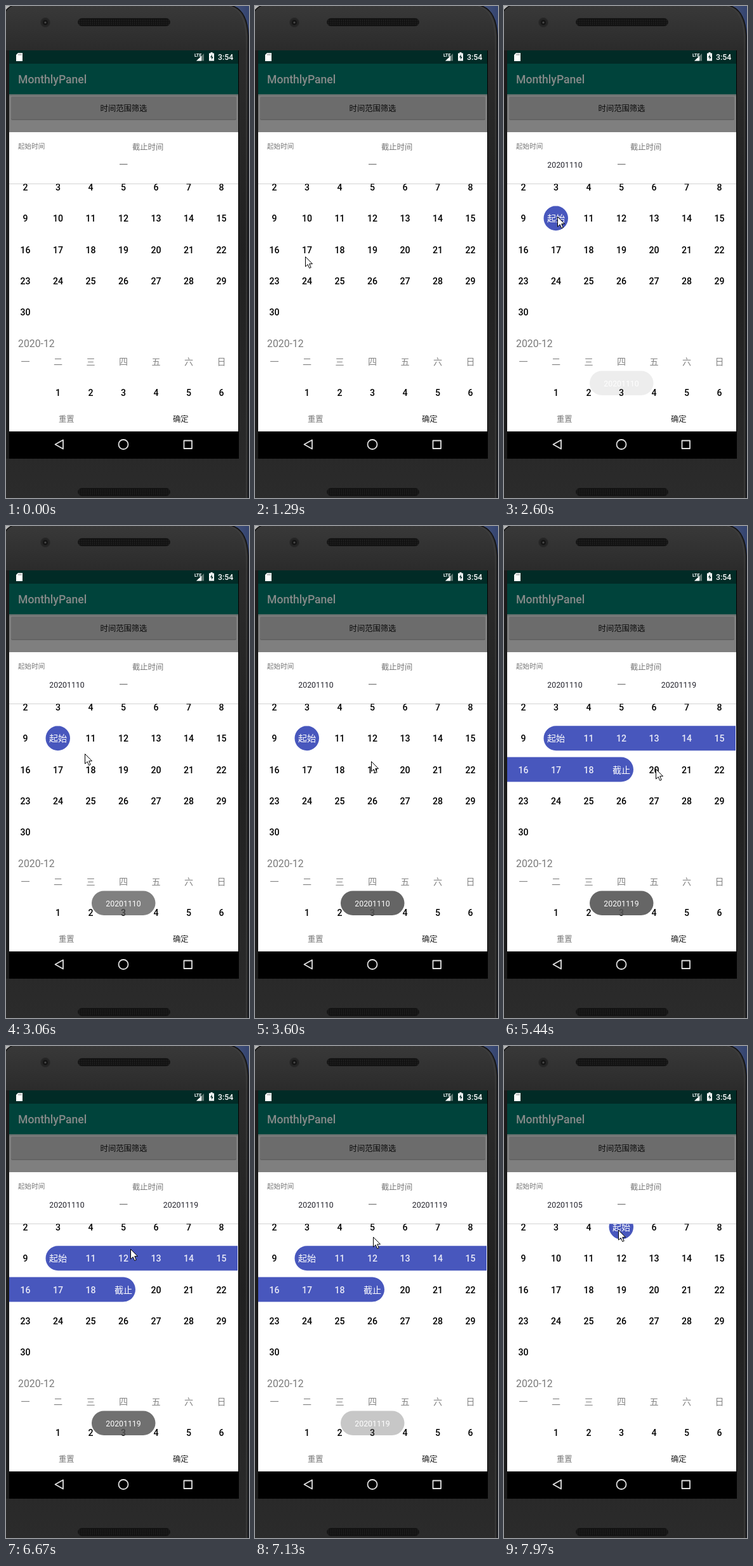
An HTML page that plays this animation: 383 px wide and 776 px high, repeating every 8 s.

```html
<!DOCTYPE html>
<html lang="zh">
<head>
<meta charset="utf-8">
<style>
  html, body { margin: 0; width: 100%; height: 100%; overflow: hidden; background: #262626; }
  svg { display: block; width: 100%; height: 100%; }
  text { font-family: Roboto, "Noto Sans CJK SC", "Noto Sans CJK", sans-serif; font-size: 12.3px; }
  .mid { text-anchor: middle; }
  .day { font-size: 14.1px; font-weight: 500; }
  .week { font-size: 14.1px; fill: #858585; }
  .mark { font-size: 14.1px; fill: #fff; }
</style>
</head>
<body>
<svg viewBox="0 0 383 776">
  <defs>
    <linearGradient id="body" x2="0" y2="1">
      <stop stop-color="#393939"/><stop offset=".09" stop-color="#2b2b2b"/>
      <stop offset=".5" stop-color="#202020"/><stop offset="1" stop-color="#2b2b2b"/>
    </linearGradient>
    <linearGradient id="desk">
      <stop stop-color="#b8b8b8"/><stop offset=".8" stop-color="#687293"/><stop offset="1" stop-color="#34446f"/>
    </linearGradient>
    <pattern id="mesh" width="3" height="3" patternUnits="userSpaceOnUse">
      <rect width="3" height="3" fill="#101010"/><circle cx="1.5" cy="1.5" r=".7" fill="#343434"/>
    </pattern>
    <clipPath id="listArea"><rect x="5" y="280.5" width="361" height="360"/></clipPath>
  </defs>

  <!-- phone -->
  <rect width="383" height="776" fill="url(#desk)"/>
  <path d="M-1 9Q3 2 11-1H354Q380 5 382 47V777H-1Z" fill="url(#body)" stroke="#111" stroke-width="1.5"/>
  <path d="M352 0Q377 7 379 49V776" fill="none" stroke="#444"/>
  <rect y="70" width="5" height="644" fill="#1b1b1b"/>
  <g fill="url(#mesh)" stroke="#191919">
    <rect x="113.500" y="19.500" width="145" height="12" rx="6"/>
    <rect x="113.500" y="760.500" width="145" height="12" rx="6"/>
  </g>
  <circle cx="62" cy="26" r="7.500" fill="#242424" stroke="#2d2d2d"/>
  <circle cx="62" cy="26" r="4" fill="#151515"/>
  <circle cx="62" cy="26" r="1.600" fill="#4a4a4a"/>

  <!-- dimmed app -->
  <rect x="5" y="70" width="362" height="644"/>
  <rect x="5" y="70" width="361" height="21" fill="#012b26"/>
  <rect x="5" y="91" width="361" height="49" fill="#00433b"/>
  <rect x="5" y="139.500" width="361" height="60" fill="#7f7f7f"/>
  <rect x="5" y="139.500" width="361" height="2" fill="#6c7271"/>
  <rect x="8" y="144" width="355" height="36" rx="2" fill="#606060"/>
  <rect x="8" y="143" width="355" height="35.500" rx="2" fill="#6c6c6c"/>
  <text x="19" y="122" fill="#868a89" style="font-size:17.6px;font-weight:500">MonthlyPanel</text>
  <text x="185.500" y="165.500" class="mid" fill="#0c0c0c">时间范围筛选</text>
  <path d="M19 74H26V87H16V77Z" fill="#fff"/>
  <path d="M20 75V78M22 75V78M24 75V78" stroke="#777" stroke-width=".8"/>
  <path d="M312 75V86.500H300Z" fill="#627873"/>
  <path d="M308 79V86.500H300Z" fill="#fff"/>
  <text x="297" y="79.500" fill="#fff" style="font-size:7px;font-weight:700">LTE</text>
  <path d="M322.500 73H325.500V74.500H328V86.500H320V74.500H322.500Z" fill="#fff"/>
  <path d="M325 76L322 81H324V85L326.500 80H324.500Z" fill="#012b26"/>
  <text x="334" y="85" fill="#fff" style="font-weight:500">3:54</text>

  <!-- sheet -->
  <rect x="5" y="199" width="361" height="472" fill="#fff"/>
  <g fill="#757575">
    <text x="19" y="225" style="font-size:10.6px">起始时间</text>
    <text x="199" y="227">截止时间</text>
    <rect x="179" y="249" width="12.500" height="1.200"/>
    <text x="83" y="655.500">重置</text>
  </g>
  <text x="263" y="655.500" fill="#222">确定</text>
  <g class="mid" fill="#25252e">
    <text id="from" x="96" y="255"></text>
    <text id="to" x="275.500" y="255"></text>
  </g>
  <rect x="5" y="280" width="361" height="1" fill="#d3d3d3"/>
  <g id="list" clip-path="url(#listArea)"></g>

  <!-- navigation bar -->
  <g fill="none" stroke="#e2e2e2" stroke-width="1.800" stroke-linejoin="round">
    <path d="M77.500 691.500L90 684.500V698.500Z"/>
    <circle cx="185" cy="691.500" r="7.500"/>
    <rect x="280.500" y="685.500" width="12.500" height="12.500"/>
  </g>

  <g id="toast">
    <rect x="135" y="575.500" width="100.500" height="38.500" rx="19.250" fill="#555"/>
    <text id="toastText" x="185" y="600" class="mid" fill="#fff"></text>
  </g>
  <path id="cursor" d="M.5.500V16L4.200 12.700L6.700 18.500L9.200 17.400L6.700 11.700H11.500Z" fill="#fff" stroke="#000" stroke-linejoin="round"/>
</svg>

<script>
const LOOP = 8000, STEP = 76.77, FIRST_STEP = 365;
const BLUE = '#4857bd', RADIUS = 19.5;
const $ = id => document.getElementById(id);

// Keyframes: time, then values
const cursorKeys = [
  [370, 276, 757], [680, 166, 555], [903, 166, 555], [1290, 79, 395],
  [1523, 79, 395], [2140, 84, 332], [2600, 84, 332], [3060, 124, 359],
  [3370, 169, 363], [3680, 188, 374], [4985, 188, 374], [5140, 203, 364],
  [5440, 239, 383], [5600, 244, 385], [5820, 238, 383], [6670, 196, 320],
  [6745, 196, 320], [7360, 180, 290]
];
const toastKeys = [
  [2523, 0], [3060, .75], [3370, .9], [4985, .9], [5140, .55], [5215, .55],
  [5440, .9], [6300, .9], [6670, .84], [6745, .84], [7360, 0]
];
const selections = [
  { at: 0 }, { at: 2600, start: 10 }, { at: 4140, start: 10, end: 19 }, { at: 7970, start: 5 }
];

function sample(keys, t) {
  const next = keys.findIndex(key => key[0] > t);
  if (next === 0) return keys[0].slice(1);
  if (next < 0) return keys[keys.length - 1].slice(1);
  const a = keys[next - 1], b = keys[next], k = (t - a[0]) / (b[0] - a[0]);
  return a.slice(1).map((v, i) => v + (b[i + 1] - v) * k);
}

const columnX = c => 30.5 + 51.5 * c;
const november = day => ({ col: (day - 2) % 7, row: Math.floor((day - 2) / 7) });
const rowY = row => 286 + 49.3 * row;
const label = (cls, x, y, text, fill = '#000') =>
  `<text class="mid ${cls}" x="${x}" y="${y}" fill="${fill}">${text}</text>`;
const dateCode = day => day ? '202011' + String(day).padStart(2, '0') : '';

function band(x1, x2, y, roundLeft, roundRight) {
  const r = RADIUS, left = roundLeft ? r : 0, right = roundRight ? r : 0;
  return `<path fill="${BLUE}" d="M${x1 + left} ${y - r}H${x2 - right}a${right} ${r} 0 0 1 0 ${2 * r}H${x1 + left}a${left} ${r} 0 0 1 0 ${-2 * r}Z"/>`;
}

function drawList({ start, end }) {
  let html = '';
  if (start) {
    const a = november(start), b = november(end || start);
    for (let row = a.row; row <= b.row; row++) {
      const first = row === a.row, last = row === b.row;
      html += band(first ? columnX(a.col) - RADIUS : 5, last ? columnX(b.col) + RADIUS - .5 : 365,
        rowY(row) - .5, first, last);
    }
  }
  for (let day = 2; day <= 30; day++) {
    const { col, row } = november(day), x = columnX(col), y = rowY(row) + 5;
    if (day === start) html += label('mark', x, y, '起始', '#fff');
    else if (day === end) html += label('mark', x, y, '截止', '#fff');
    else html += label('day', x, y, day, day > start && day < end ? '#e8e9f7' : '#000');
  }
  html += '<text x="19" y="538" fill="#7a7a7a" style="font-size:15.8px">2020-12</text>';
  [...'一二三四五六日'].forEach((name, c) => html += label('week', columnX(c), 565.5, name));
  for (let day = 1; day <= 6; day++) html += label('day', columnX(day), 614.8, day);
  $('list').innerHTML = html;
  $('from').textContent = dateCode(start);
  $('to').textContent = dateCode(end);
}

let shown;
function render(t) {
  const selection = selections.filter(s => s.at <= t).pop();
  if (selection !== shown) drawList(shown = selection);

  // The screen updates in steps of about 77 ms
  const stepped = 370 + Math.floor((t - FIRST_STEP) / STEP) * STEP;
  const [x, y] = sample(cursorKeys, stepped);
  $('cursor').setAttribute('transform', `translate(${Math.round(x)} ${Math.round(y)})`);
  $('cursor').style.visibility = t < 370 ? 'hidden' : 'visible';
  $('toast').style.opacity = sample(toastKeys, stepped)[0];
  $('toastText').textContent = dateCode(t < 5200 ? 10 : 19);
}

const origin = performance.now();
function frame() {
  render((performance.now() - origin) % LOOP);
  requestAnimationFrame(frame);
}
frame();
</script>
</body>
</html>
```
